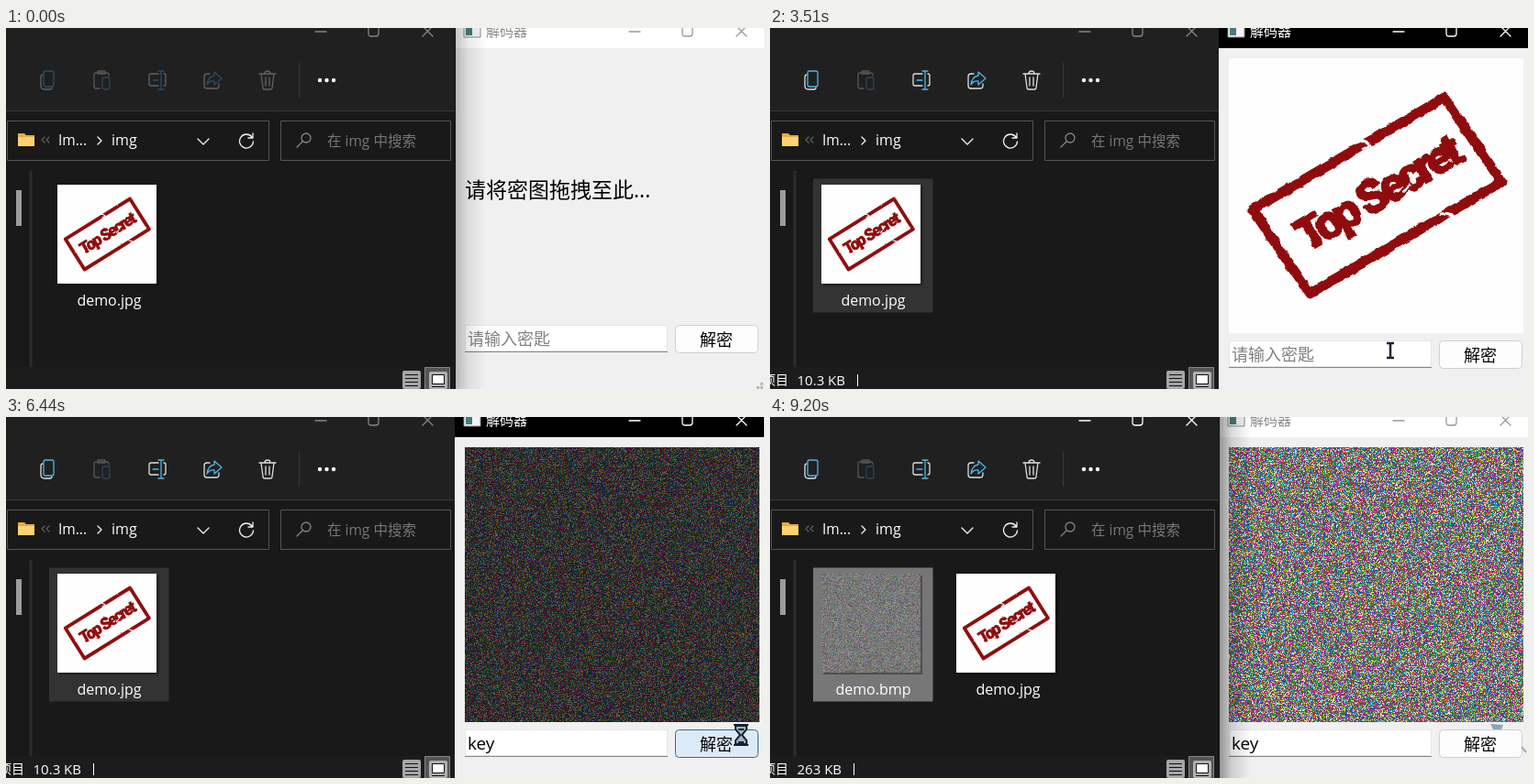
An HTML page with a canvas for the animation above (9280 ms loop, 826x394 px).

```html
<!DOCTYPE html>
<html lang="zh">
<head>
<meta charset="utf-8">
<title>解码器</title>
<style>
html, body { margin: 0; width: 100%; height: 100%; overflow: hidden; background: #191919; }
svg { display: block; }
text { font: 16px "Open Sans", "Noto Sans", "Noto Sans CJK SC", "Noto Sans CJK", sans-serif; white-space: pre; }
canvas { display: block; }
.line { fill: none; stroke-width: 1.3; stroke-linecap: round; stroke-linejoin: round; }
.tools { --w: #626262; --b: #2b4c62; }
.tools.on { --w: #dedede; --b: #4cb4ec; }
.dim { --w: #565656; --b: #2b4558; }
.w { stroke: var(--w); }
.b { stroke: var(--b); }
.caption { fill: #fff; text-anchor: middle; }
.stamp { font: 900 51px Roboto, "Liberation Sans", sans-serif; letter-spacing: -5px; text-anchor: middle; }
</style>
</head>
<body>
<svg width="826" height="394" viewBox="0 0 826 394">
  <defs>
    <linearGradient id="shade"><stop stop-color="#000" stop-opacity=".38"/><stop offset=".4" stop-color="#000" stop-opacity=".14"/><stop offset="1" stop-color="#000" stop-opacity="0"/></linearGradient>
    <linearGradient id="glass" x2="0" y2="1"><stop stop-color="#e6f1f6"/><stop offset="1" stop-color="#c5e3f1"/></linearGradient>
    <filter id="rough" color-interpolation-filters="sRGB"><feTurbulence type="fractalNoise" baseFrequency=".09" numOctaves="2" seed="4"/><feDisplacementMap in="SourceGraphic" scale="5" xChannelSelector="R" yChannelSelector="G"/></filter>
    <filter id="soft" x="-20%" y="-20%" width="140%" height="140%"><feDropShadow dx="2" dy="2" stdDeviation="1.5" flood-opacity=".45"/></filter>
    <symbol id="secret" viewBox="0 0 321 300" preserveAspectRatio="none">
      <path fill="#fefefe" d="M0 0h321v300H0z"/>
      <g filter="url(#rough)">
        <path d="M26 165 88 257 297 135 235 43Z" fill="none" stroke="#900b0d" stroke-width="11" stroke-linejoin="round"/>
        <text class="stamp" fill="#900b0d" stroke="#900b0d" stroke-width="1.500" transform="translate(170 163) rotate(-30.5)">Top Secret</text>
        <path d="m141 88 13 5m-9 7 11-6M230 169l15 3m-11 8 10-7M190 146l9-8" stroke="#fefefe" stroke-width="3" fill="none"/>
      </g>
    </symbol>
    <g id="controls" class="line"><path d="M-63 4h12M-5-7H3Q6-7 6-4V6Q6 9 3 9H-2Q-5 9-5 6ZM54-2 65 9M65-2 54 9"/></g>
  </defs>

  <!-- decoder window -->
  <g>
    <path fill="#f0f0f0" d="M489 0h337v394H489z"/>
    <path id="titleBar" d="M489 0h337v22H489z"/>
    <path d="M499-4h18V10h-18z" fill="#f4f4f4" stroke="#8b8b8b"/><path d="M501 0h7v8h-7z" fill="#4a7a80"/>
    <text id="titleText" x="523" y="9" style="font-size:15px">解码器</text>
    <use id="rightControls" href="#controls" x="742"/>
    <text id="hint" x="500" y="185" style="font-size:23px">请将密图拖拽至此...</text>
    <g id="picture">
      <use href="#secret" x="500" y="33" width="321" height="300"/>
      <foreignObject id="noiseBox" x="500" y="33" width="321" height="300"><canvas id="noise" width="321" height="300"></canvas></foreignObject>
      <path id="veil" d="M500 33h321v300H500z"/>
    </g>
    <g id="form">
      <path fill="#fff" stroke="#e6e6e6" d="M500.500 324.500h220v28h-220z"/>
      <path stroke="#868686" d="M500 353.500h221"/>
      <text id="field" x="503" y="346"></text>
      <path id="caret" stroke="#000" d="M0 329v20"/>
      <rect id="button" x="729.500" y="324.500" width="90" height="30" rx="4"/>
      <text x="774" y="347" text-anchor="middle" style="font-size:18px">解密</text>
    </g>
    <path id="grip" fill="#b8b8b8" d="M822 387h3v3h-3zM822 391h3v3h-3zM818 391h3v3h-3z"/>
    <g id="trace"><path fill="#8fa3b8" d="m785 335 14 1-2 5h-9z"/><path stroke="#aaa" stroke-width="2" d="m819 360 5 6"/></g>
    <path id="shadow" fill="url(#shade)" d="M490 0h34v394h-34z"/>
  </g>

  <!-- file manager -->
  <g>
    <path fill="#191919" d="M0 0h489v394H0z"/>
    <path fill="#202020" d="M0 0h489v90H0z"/>
    <path stroke="#393939" d="M0 90.500h489M319.500 38v38"/>
    <path fill="#1c1c1c" d="M0 370h489v24H0z"/>
    <path stroke="#2d2d2d" stroke-width="3" d="M27 156v214"/>
    <path id="edge" stroke="#111" d="M489.500 0v394"/>
    <rect x="11" y="177" width="6" height="39" fill="#9d9d9d"/>
    <use id="leftControls" href="#controls" x="400"/>
    <g id="tools" class="tools line">
      <g transform="translate(45 57)"><path class="w" d="M-5-6q-2 0-2 3v9q0 4 4 4h6q2 0 2-2"/><rect class="b" x="-4" y="-10" width="11" height="17" rx="2"/></g>
      <g class="dim" transform="translate(105 57)"><path class="w" d="M-3 9h-4q-2 0-2-2V-6q0-2 2-2h12q2 0 2 2v1M-5-10h8v3h-8z"/><rect class="b" x="0" y="-3" width="8" height="13" rx="2"/></g>
      <g transform="translate(165 57)"><path class="w" d="M1-7h-8q-2 0-2 2v9q0 2 2 2h8M7-7q2 0 2 2v9q0 2-2 2"/><path class="b" d="M1-10h6M4-10v20M1 10h6M-5 0h6"/></g>
      <g transform="translate(225 57)"><path class="w" d="M-3-7h-3q-3 0-3 3v10q0 3 3 3h10q3 0 3-3v-2"/><path class="b" d="m2-9 8 7-8 7V1q-5-1-8 4 1-9 8-10Z"/></g>
      <g transform="translate(285 57)"><path class="w" d="M-9-7H9M-3-7q0-3 3-3t3 3M-7-7-5 8q0 2 2 2h6q2 0 2-2L7-7M-2-3v9M2-3v9"/></g>
    </g>
    <g fill="#fff"><circle cx="342" cy="57" r="2.200"/><circle cx="349.500" cy="57" r="2.200"/><circle cx="357" cy="57" r="2.200"/></g>
    <path fill="#191919" stroke="#555" d="M1.500 101.500h285v43H1.500zM299.500 101.500h185v43h-185z"/>
    <path fill="#e9a93c" d="M13 115h7l2 2h9v12H13z"/><path fill="#ffd271" d="M13 119h18v10H13z"/>
    <path id="crumbs" class="line" d="m42 119-3 3 3 3m5-6-3 3 3 3"/>
    <text x="57" y="128" fill="#fff" style="font-size:15.500px">Im...</text>
    <text x="115" y="128" fill="#fff">img</text>
    <g class="line" stroke="#f0f0f0"><path d="m100 119 4 4-4 4M209 121l6 6 6-6M268 119a7.500 7.500 0 1 0 1.500 5M269 115v5h-5"/></g>
    <g class="line" stroke="#858585"><circle cx="327" cy="120" r="5"/><path d="m323 124-6 6"/></g>
    <text x="350" y="129" fill="#767676" style="font-size:15.500px">在 img 中搜索</text>

    <g id="jpg">
      <rect class="tile" x="47" y="164.500" width="130.500" height="146"/>
      <g filter="url(#soft)"><use href="#secret" x="56" y="171" width="108" height="108"/></g>
      <text class="caption" x="112.500" y="303">demo.jpg</text>
    </g>
    <g id="bmp">
      <rect class="tile" x="47" y="164.500" width="130.500" height="146"/>
      <path d="M58 173h108v108H58z" opacity=".35"/>
      <foreignObject x="56" y="171" width="108" height="108"><canvas id="thumb" width="108" height="108"></canvas></foreignObject>
      <text class="caption" x="112.500" y="303">demo.bmp</text>
    </g>

    <g id="status" fill="#fff">
      <text x="-8" y="389" style="font-size:14px">项目</text>
      <text id="size" x="29.500" y="390" style="font-size:15px"></text>
      <path id="divider" stroke="#fff" d="M0 378v13"/>
    </g>
    <rect x="432" y="374" width="20" height="20" rx="2" fill="#a6a6a6"/>
    <path stroke="#111" d="M435 378.500h14M435 382.500h14M435 386.500h14M435 390.500h14"/>
    <path fill="#555" stroke="#858585" d="M456.500 370.500h27v24h-27z"/>
    <rect x="461" y="375" width="20" height="19" rx="2" fill="#b0b0b0"/>
    <path fill="#fff" stroke="#111" d="M464.500 378.500h13v10h-13zM464 391.500h14"/>
  </g>

  <!-- pointer -->
  <g id="pointer">
    <g id="ghost"><rect x="-66" y="-115" width="130" height="130" rx="2" fill="url(#glass)" stroke="#b9dfef" filter="url(#soft)" opacity=".68"/></g>
    <circle id="glow" cx="-1" r="15" fill="#f0f04a" opacity=".72"/>
    <path id="arrow" d="M0 0v16l4-3 3 7 3-1-3-7h6z" fill="#6a86b8" stroke="#161d30" stroke-width="1.500"/>
    <path id="beam" d="M-4-8h3l1 1 1-1h3M0-7V7M-4 8h3l1-1 1 1h3" fill="none" stroke="#1c2430" stroke-width="2.500"/>
    <g id="hourglass" stroke="#17222e" stroke-width="2"><path fill="#9fb4c6" d="M-6-10H6v4L1 0l5 6v4H-6V6l5-6-5-6z"/><path d="M-8-11H8M-8 11H8M-3 8h6M-3-6h6"/></g>
    <g id="tip">
      <rect x="13.500" y="17.500" width="63" height="24" rx="3" fill="#fbfbfb" stroke="#dedede"/>
      <path stroke="#222" stroke-width="1.300" d="M19 29h14M26 22v14"/>
      <text x="38" y="35" fill="#0a3fd0" style="font-size:15px">复制</text>
    </g>
  </g>
</svg>
<script>
const LOOP = 9280;
const SELECT = 1370, DRAG = 1510, DROP = 2490, RUN = 5740, BLACK = 6240, DONE = 6740,
      SAVED = 6790, SORTED = 7410, RESELECT = 8100;

const el = Object.fromEntries([...document.querySelectorAll('[id]')].map(e => [e.id, e]));
const show = (e, on) => e.style.display = on ? '' : 'none';
const attr = (e, values) => { for (const k in values) e.setAttribute(k, values[k]); };
const within = (t, a, b) => t >= a && t < b;

// time, x, y
const route = [
  [540, 543, 396], [1300, 125, 238], [DRAG, 125, 238], [2070, 600, 223], [2420, 655, 170],
  [DROP, 655, 170], [3100, 676, 352], [5050, 676, 352], [5600, 786, 349], [5810, 788, 349],
  [6440, 801, 347], [6930, 804, 352], [7070, 809, 361], [7340, 809, 361], [7800, 147, 248],
  [8370, 147, 248], [9130, 430, 400]
];

function pointerAt(t) {
  const i = route.findIndex(p => p[0] > t);
  if (i < 1) return null;
  const [t0, x0, y0] = route[i - 1], [t1, x1, y1] = route[i];
  const u = (t - t0) / (t1 - t0), k = u * u * (3 - 2 * u);
  return [x0 + (x1 - x0) * k, y0 + (y1 - y0) * k];
}

function randomizer(seed) {
  return () => (seed = (seed * 1664525 + 1013904223) >>> 0) / 4294967296;
}

function speckle(canvas, seed, pick) {
  const g = canvas.getContext('2d'), random = randomizer(seed);
  const image = g.createImageData(canvas.width, canvas.height);
  for (let i = 0; i < image.data.length; i += 4) image.data.set([...pick(random), 255], i);
  g.putImageData(image, 0, 0);
}

const hues = [
  [15, 120, 80], [40, 70, 170], [210, 25, 150], [215, 220, 70], [50, 190, 215],
  [80, 165, 45], [235, 225, 235], [110, 50, 130], [150, 110, 60], [170, 50, 60]
];
speckle(el.noise, 7, r => hues[Math.floor(r() * hues.length)]);
speckle(el.thumb, 19, r => {
  const base = 75 + r() * 45;
  return [0, 0, 0].map(() => base + r() * 45);
});

function drawDecoder(t) {
  const loaded = t >= DROP, active = within(t, DROP, RESELECT);
  attr(el.titleBar, { fill: active ? '#000' : '#fff' });
  attr(el.titleText, { fill: active ? '#fff' : '#8c8c8c' });
  attr(el.rightControls, { stroke: active ? '#fff' : '#999' });
  show(el.edge, !active);
  show(el.shadow, !active);
  attr(el.shadow, { opacity: t < SELECT ? .6 : 1 });
  show(el.hint, !loaded);
  show(el.grip, !loaded);
  show(el.picture, loaded);
  show(el.noiseBox, t >= BLACK);
  const light = t < BLACK ? (BLACK - t) / (BLACK - RUN) : (t - BLACK) / (DONE - BLACK);
  attr(el.veil, { opacity: 1 - Math.min(1, light) });
  show(el.trace, t >= 6930);

  attr(el.form, { transform: `translate(0 ${loaded ? 17 : 0})` });
  const typed = 'key'.slice(0, (t >= 4170) + (t >= 4240) + (t >= 4510));
  el.field.textContent = typed || '请输入密匙';
  el.field.style.fontSize = typed ? '19px' : '18px';
  attr(el.field, { fill: typed ? '#000' : '#808080' });
  show(el.caret, within(t, 3100, 3510) || within(t, 4040, 5050));
  attr(el.caret, { transform: `translate(${503.5 + typed.length * 10} 0)` });
  const hover = within(t, 5400, 7070);
  attr(el.button, { fill: hover ? '#dceaf6' : '#fdfdfd', stroke: hover ? '#2d6da3' : '#cfcfcf' });
}

function drawTile(file, fill, x) {
  attr(file, { transform: `translate(${x} 0)` });
  attr(file.querySelector('.tile'), { fill });
}

function drawExplorer(t) {
  const dragged = within(t, SELECT, DROP), active = dragged || t >= RESELECT;
  attr(el.leftControls, { stroke: active ? '#fff' : '#858585' });
  attr(el.crumbs, { stroke: dragged ? '#a5a5a5' : '#5c5c5c' });
  el.tools.classList.toggle('on', t >= SELECT);

  const sorted = t >= SORTED;
  const jpgFill = t >= RESELECT ? 'none' : t >= DROP ? '#333' : t >= SELECT ? '#777' : t >= 1160 ? '#2d2d2d' : 'none';
  const bmpFill = t >= RESELECT ? '#777' : t >= 7700 ? '#4d4d4d' : 'none';
  drawTile(el.jpg, jpgFill, sorted ? 147 : 0);
  drawTile(el.bmp, bmpFill, sorted ? 0 : 147);
  show(el.bmp, t >= SAVED);

  const resized = t >= 8440;
  show(el.status, t >= DRAG);
  el.size.textContent = resized ? '263 KB' : '10.3 KB';
  attr(el.divider, { transform: `translate(${resized ? 91.5 : 95.5} 0)` });
}

function drawPointer(t) {
  const at = pointerAt(t);
  show(el.pointer, at);
  if (!at) return;
  attr(el.pointer, { transform: `translate(${at.map(Math.round).join(' ')})` });
  const dragging = within(t, DRAG, DROP), busy = within(t, RUN, 6860);
  const editing = within(t, DROP, 5600) && at[1] > 340 && at[0] < 721;
  show(el.arrow, !busy && !editing);
  show(el.beam, editing);
  show(el.hourglass, busy);
  show(el.ghost, dragging);
  show(el.tip, dragging && at[0] > 489);
  show(el.glow, within(t, SELECT, DROP) || within(t, 3100, 3170) || within(t, 5600, RUN) || within(t, RESELECT, 8240));
}

function frame(now) {
  const t = now % LOOP;
  drawDecoder(t);
  drawExplorer(t);
  drawPointer(t);
  requestAnimationFrame(frame);
}
frame(0);
</script>
</body>
</html>
```
